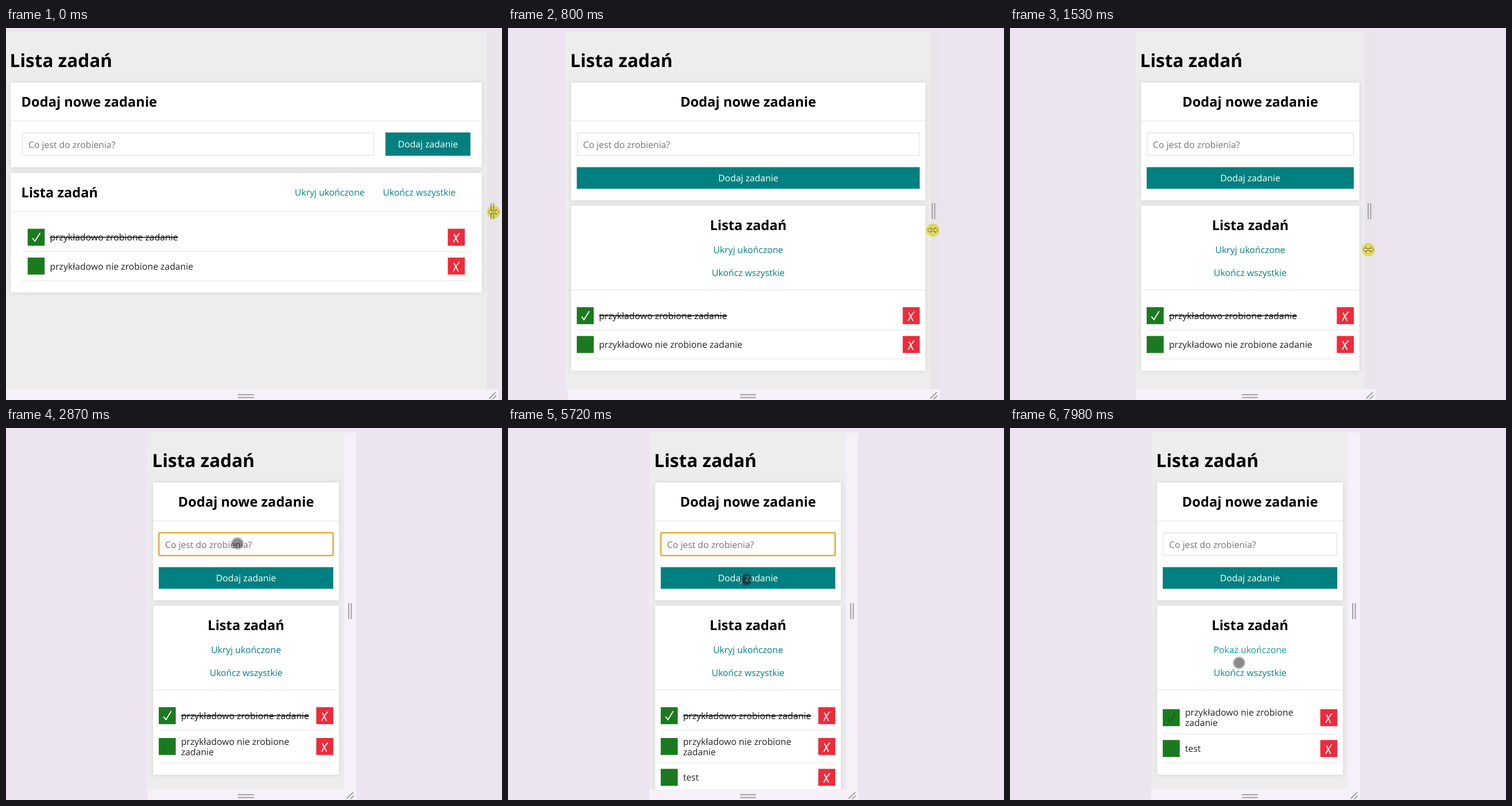
An HTML page that plays this animation: 864x648 px, repeating every 8 s.

```html
<!DOCTYPE html>
<html lang="pl">
<head>
<meta charset="utf-8">
<title>Lista zadań</title>
<style>
  html, body { margin: 0; height: 100%; overflow: hidden; background: #ece5f1; }
  svg { display: block; font: 15.75px "Open Sans", sans-serif; text-rendering: geometricPrecision; }
  .card { fill: #fff; filter: drop-shadow(0 0 5px rgba(0, 0, 0, .1)); }
  .h1 { font-size: 31.6px; font-weight: 700; }
  .h2 { font-size: 23.65px; font-weight: 700; }
  .hint { fill: #757575; }
  .link { fill: #008080; }
  .label { fill: #222; }
  .done { fill: #111; text-decoration: line-through; }
  .mid { text-anchor: middle; }
  .end { text-anchor: end; }
  .mark { fill: none; stroke: #fff; stroke-width: 1.8; }
  .grip { fill: none; stroke: #a0a0a0; stroke-width: 1.9; }
</style>
</head>
<body>
<svg id="stage" width="864" height="648" viewBox="0 0 864 648"></svg>
<script>
const LOOP = 8000;
const stage = document.getElementById('stage');

// Keyframe tracks: [time, values...]
const CARD = [[0, 828.7], [50, 827], [410, 785], [800, 727], [850, 722], [1530, 608.7], [1700, 591.5], [1900, 579.8]];
const FRAME = [[0, 858], [50, 856], [410, 814], [800, 752], [850, 747], [1530, 637], [1700, 621], [1900, 610]];
const POINTER = [[0, 849.5, 320.5], [410, 798, 340], [800, 740, 352], [1530, 624.5, 386], [1700, 608, 390],
  [1950, 599, 392], [2300, 408, 201], [2560, 408, 201], [2700, 403, 201], [5300, 403, 201], [5530, 415, 264],
  [6300, 415, 264], [6900, 401, 399], [7100, 399, 388], [7300, 399, 386], [7840, 399, 386], [7980, 399, 409]];
const TYPING = [3710, 3760, 4080, 4240];
const CARET_ON = [[2340, 2870], [3400, 4710], [5190, 5720], [6250, 6780]];
const ADDED = 4880, FOCUS = 2340, HIDE = 7050;

function track(t, keys) {
  const i = keys.findIndex(k => k[0] > t);
  if (i < 0) return keys[keys.length - 1].slice(1);
  const a = keys[i - 1], b = keys[i], p = (t - a[0]) / (b[0] - a[0]);
  return a.slice(1).map((v, j) => v + (b[j + 1] - v) * p);
}
const ramp = (t, a, b) => Math.min(1, Math.max(0, (t - a) / (b - a)));
const mix = (a, b, p) => `rgb(${a.map((v, i) => Math.round(v + (b[i] - v) * p))})`;
const rect = (x, y, w, h, fill, more = '') =>
  `<rect x="${x}" y="${y}" width="${w}" height="${h}" fill="${fill}" ${more}/>`;
const text = (x, y, s, cls, more = '') => `<text x="${x}" y="${y}" class="${cls}" ${more}>${s}</text>`;
const path = (d, cls, more = '') => `<path d="${d}" class="${cls}" ${more}/>`;
const card = (x, y, w, h) => rect(x, y, w, h, '#fff', 'class="card"');
const rule = (x, y, w) => rect(x, y, w, 1.2, '#e8e8e8');

function inputBox(t, x, w) {
  const focused = t >= FOCUS && t < HIDE;
  const typed = t < ADDED ? 'test'.slice(0, TYPING.filter(k => t >= k).length) : '';
  let out = focused
    ? rect(x + .3, 182.4, w - .6, 39.8, '#fff', 'rx="2" stroke="#e59700" stroke-width="2"')
    : rect(x + .8, 182.8, w - 1.6, 39, '#fff', 'stroke="#e8e8e8" stroke-width="1.6"');
  out += typed ? text(x + 11, 208.5, typed, 'label') : text(x + 11, 208.5, 'Co jest do zrobienia?', 'hint');
  const caretX = 277 + [0, 5.6, 14.4, 22, 27][typed.length];
  if (CARET_ON.some(([a, b]) => t >= a && t < b)) out += rect(Math.round(caretX), 194, 1, 18, '#000');
  return out;
}

function addButton(t, x, y, w, h) {
  const hover = ramp(t, 6180, 6400) - ramp(t, HIDE, HIDE + 220);
  const cx = x + w / 2, cy = y + h / 2, k = 1 + .03 * hover;
  return `<g transform="translate(${cx} ${cy}) scale(${k})">` +
    rect(-w / 2, -h / 2, w, h, mix([0, 128, 128], [0, 143, 143], hover)) +
    text(0, 6, 'Dodaj zadanie', 'mid', 'fill="#fff"') + '</g>';
}

// Returns the drawn rows and the y below the last one.
function taskList(t, x, y, w, pad) {
  const tasks = [['przykładowo zrobione', 'zadanie'], ['przykładowo nie zrobione', 'zadanie']];
  if (t >= ADDED) tasks.push(['test']);
  const hidden = t >= HIDE;
  if (hidden) tasks.shift();
  let out = '';
  tasks.forEach((words, i) => {
    const done = i === 0 && !hidden;
    const wrap = !done && words.length > 1 && w < 329;
    const lines = wrap ? words : [words.join(' ')];
    const h = wrap ? 57.2 : 50.2, cy = y + (h - .8) / 2;
    const left = x + pad, right = x + w - pad;
    out += rect(left, cy - 14.8, 29.6, 29.6, '#1b7a1f') + rect(right - 29.6, cy - 14.8, 29.6, 29.6, '#ee2b3b');
    if (i === 0) {
      const ink = mix([255, 255, 255], [18, 98, 24], ramp(t, HIDE, HIDE + 600));
      out += path('M-6.5 1.5L-2.3 7L7 -7.8', 'mark', `transform="translate(${left + 14.8} ${cy})" style="stroke:${ink}"`);
    }
    out += path('M-4.2 -5.5Q-1 1 3.3 9.2M5.4 -7.2Q-1 0 -5.3 9', 'mark', `transform="translate(${right - 14.8} ${cy})"`);
    lines.forEach((s, n) => {
      const dy = (n - (lines.length - 1) / 2) * 18.1;
      out += text(left + 38.8, cy + 5.8 + dy, s, done ? 'done' : 'label');
    });
    y += h;
    out += rule(x, y - 1, w);
  });
  return [out, y];
}

function page(t) {
  const [right] = track(t, CARD);
  const left = 837 - right - (t > 1700 ? .8 : 0), w = right - left, mid = (left + right) / 2;
  const wide = w > 737, pad = wide ? 19.7 : 9.7;
  const x = left + pad, inner = w - 2 * pad;
  const top = wide ? 252.5 : 309.6, split = wide ? 319 : 455.6;
  const toggle = t < HIDE ? 'Ukryj ukończone' : 'Pokaż ukończone';
  const hover = `style="fill:${mix([0, 128, 128], [20, 156, 156], ramp(t, HIDE, HIDE + 300))}"`;
  const [rows, bottom] = taskList(t, x, split + 20.8, inner, wide ? 9.7 : 0);

  let out = rect(left - 10, 7, w + 19.3, 623, '#ededed');
  out += text(left - 1.8, 67.5, 'Lista zadań', 'h1');
  out += card(left, 95, w, wide ? 147.3 : 204.7) + rule(left, 161, w);
  out += card(left, top, w, bottom + 20.2 - top) + rule(left, split, w);
  if (wide) {
    out += text(x - 1.5, 136.9, 'Dodaj nowe zadanie', 'h2') + text(x - 1.5, 294.7, 'Lista zadań', 'h2');
    out += inputBox(t, x, inner - 167.7) + addButton(t, x + inner - 148, 182, 148, 40.6);
    out += text(right - 203.8, 291.8, toggle, 'link end') + text(right - 45.4, 291.8, 'Ukończ wszystkie', 'link end');
  } else {
    out += text(mid, 136.9, 'Dodaj nowe zadanie', 'h2 mid') + text(mid, 351.7, 'Lista zadań', 'h2 mid');
    out += inputBox(t, x, inner) + addButton(t, x, 242.4, inner, 37.6);
    out += text(mid, 391.7, toggle, 'link mid', hover) + text(mid, 431.5, 'Ukończ wszystkie', 'link mid');
  }
  return out + rows;
}

function frame(t) {
  const [r] = track(t, FRAME), [cardRight] = track(t, CARD);
  const edge = cardRight + 9.3;
  return rect(edge, 8, r - edge, 622, t < 1900 ? '#e8e4ea' : '#f6f1f9') +
    rect(856 - r, 629, 2 * r - 856, 19, '#f6f1f9') +
    path(`M${r - 13} 305V333M${r - 8.6} 305V333M404 638.7H432M404 643.7H432`, 'grip') +
    path(`M${r - 16.5} 645.5L${r - 5} 634.5M${r - 10.5} 646.5L${r - 4} 640.5`, 'grip');
}

function pointer(t) {
  const [x, y] = track(t, POINTER);
  const at = `<g transform="translate(${x} ${y})">`;
  if (t > 1950 && x < 589) {
    return at + '<circle r="11" fill="#000" opacity=".22"/><circle r="9" fill="#000" opacity=".3"/></g>';
  }
  return at + '<circle r="11.5" fill="#f5ef6a" style="mix-blend-mode:multiply"/>' +
    '<path d="M-9 0l5-4.5v3h8v-3l5 4.5l-5 4.5v-3h-8v3z" fill="#f3ec74" stroke="#55502a" stroke-width=".9"/></g>';
}

function draw(now) {
  const t = now % LOOP;
  stage.innerHTML = page(t) + frame(t) + pointer(t);
  requestAnimationFrame(draw);
}
draw(0);
</script>
</body>
</html>
```
